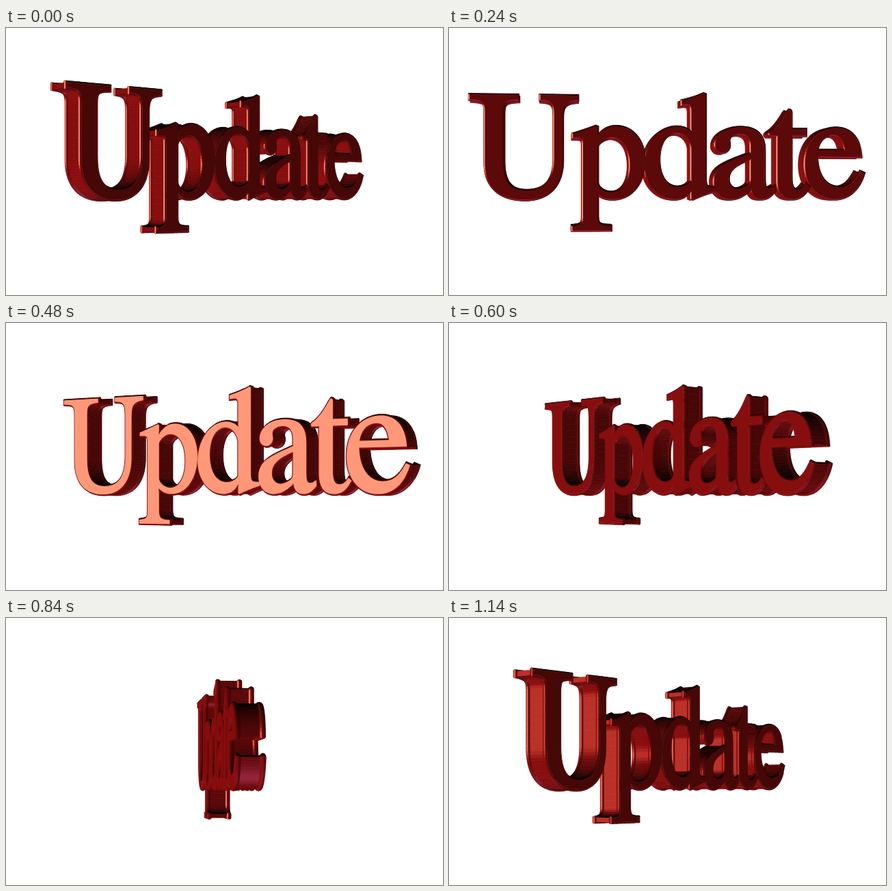
Animation, 639 px wide and 391 px high, one loop 1200 ms. Source, as an HTML page with a canvas:

```html
<!DOCTYPE html>
<html lang="en">
<head>
<meta charset="utf-8">
<title>Update</title>
<style>
  html, body { margin: 0; width: 100%; height: 100%; overflow: hidden; background: #fff; }
  canvas { display: block; }
</style>
</head>
<body>
<canvas id="stage" width="639" height="391" role="img" aria-label="Update"></canvas>
<script>
const ctx = document.getElementById('stage').getContext('2d');
const W = 639, H = 391;
const STEP = 60, STEPS = 20, TURN = 9, START = 42;   // ms, poses per loop, degrees
const CX = 319.5, HORIZON = 248, DIST = 1490;
const SIZE = 217, TRACK = -9.7, LEFT = -285.5, BASE = -1;
// Cross-section of the extrusion, back to front: [depth, outset]
const PROFILE = [[-19, 1.2], [-18, 2.6], [-16, 3.2], [-14, 2.7], [-12, 1], [11, 1], [13, 2.7], [15, 3.2], [17, 2.6], [18, 1.2]];

// Roman letterforms on a 1000-unit em, y up; outer loops run clockwise
const GLYPHS = {
  U: { adv: 722, path: `M14 662 L314 662 L314 643 C228 638 215 625 215 553 L215 238 C215 98 262 34 376 34
    C500 34 563 100 563 255 L563 530 C563 622 549 638 473 643 L473 662 L705 662 L705 643
    C632 635 605 615 605 530 L605 243 C605 75 515 -14 363 -14 C200 -14 113 72 113 226
    L113 553 C113 627 102 637 14 643` },
  p: { adv: 500, path: `M9 395 L9 410 C60 425 105 442 154 460 L159 458 L159 383 C200 437 235 460 290 460
    C395 460 470 370 470 238 C470 95 385 -10 268 -10 C222 -10 194 2 159 33 L159 -128
    C159 -180 172 -199 247 -200 L247 -217 L5 -217 L5 -200 C66 -195 75 -183 75 -131
    L75 342 C75 382 68 394 35 394
    M159 334 L159 91 C159 60 205 22 256 22 C335 22 385 95 385 208 C385 325 335 400 255 400 C205 400 159 355 159 334` },
  d: { adv: 500, path: `M491 58 L491 42 C440 30 390 10 345 -10 L340 -8 L340 66 C310 15 275 -10 227 -10
    C110 -10 27 85 27 206 C27 345 120 460 240 460 C280 460 312 445 340 417 L340 570
    C340 612 334 622 302 622 L276 620 L276 636 C330 649 380 665 418 683 L424 681 L424 126 C424 72 432 60 465 59
    M340 102 L340 328 C335 385 290 432 235 432 C160 432 112 360 112 248 C112 130 165 58 245 58 C290 58 325 76 340 102` },
  a: { adv: 444, path: `M442 66 L442 40 C412 2 385 -10 355 -10 C315 -10 293 14 288 62 C235 14 195 -10 142 -10
    C80 -10 37 34 37 100 C37 150 60 184 105 210 C145 234 190 252 287 288 L287 332
    C287 397 260 428 205 428 C160 428 128 408 128 378 C128 365 132 355 132 345
    C132 320 112 302 88 302 C64 302 45 320 45 346 C45 410 115 460 212 460
    C320 460 370 415 370 310 L370 120 C370 65 378 50 402 50 C416 50 427 54 442 66
    M287 262 C170 222 124 180 124 118 C124 76 152 45 192 45 C210 45 235 53 258 66 C283 82 287 90 287 130` },
  t: { adv: 278, path: `M255 450 L255 418 L154 418 L154 130 C154 68 168 40 205 40 C230 40 247 52 266 78 L279 67
    C250 15 215 -10 168 -10 C103 -10 70 30 70 112 L70 418 L17 418 C12 421 12 430 28 439
    C60 458 95 500 124 545 C134 562 142 573 147 579 C153 579 154 576 154 566 L154 450` },
  e: { adv: 444, path: `M408 164 L424 157 C396 62 327 -10 229 -10 C98 -10 25 91 25 219 C25 374 124 460 239 460
    C336 460 396 395 405 277 L97 277 C100 130 170 58 257 58 C325 58 365 90 408 164
    M99 309 L304 309 C293 383 268 425 213 425 C158 425 109 385 99 309` },
};

const unit = v => { const l = Math.hypot(...v) || 1; return v.map(c => c / l); };
const dot = (a, b) => a[0] * b[0] + a[1] * b[1] + a[2] * b[2];
const rad = d => d * Math.PI / 180;
const dist = (p, q) => Math.hypot(p[0] - q[0], p[1] - q[1]);

// Path text to closed loops of points
function flatten(path) {
  const loops = [];
  let loop, p;
  for (const [, cmd, args] of path.matchAll(/([MLC])([^MLC]+)/g)) {
    const v = args.trim().split(/\s+/).map(Number), end = v.slice(-2);
    if (cmd === 'M') loops.push(loop = []);
    if (cmd === 'C') {
      const n = Math.ceil(3 + dist(p, end) / 18);
      for (let i = 1; i < n; i++) {
        const t = i / n, u = 1 - t;
        loop.push([0, 1].map(k => u * u * u * p[k] + 3 * u * u * t * v[k] + 3 * u * t * t * v[k + 2] + t * t * t * v[k + 4]));
      }
    }
    loop.push(p = end);
  }
  return loops.map(l => dist(l[0], l[l.length - 1]) < 1 ? l.slice(0, -1) : l);
}

// Short pieces keep the depth sort reliable
function subdivide(loop, max) {
  return loop.flatMap((p, i) => {
    const q = loop[(i + 1) % loop.length];
    const n = Math.ceil(dist(p, q) / max) || 1;
    return Array.from({ length: n }, (_, k) => [p[0] + (q[0] - p[0]) * k / n, p[1] + (q[1] - p[1]) * k / n]);
  });
}

// Vertices with position and outward miter; edges with normal and midpoint
function buildMesh(word) {
  const loops = [], edges = [];
  const k = SIZE / 1000;
  let left = LEFT;
  for (const ch of word) {
    for (const raw of flatten(GLYPHS[ch].path)) {
      const pts = subdivide(raw.map(([x, y]) => [left + x * k, BASE - y * k]), 10);
      const n = pts.length;
      const normals = pts.map((p, i) => {
        const q = pts[(i + 1) % n], l = dist(p, q) || 1;
        return [(q[1] - p[1]) / l, (p[0] - q[0]) / l];
      });
      const verts = pts.map((p, i) => {
        const a = normals[(i + n - 1) % n], b = normals[i];
        const m = Math.max(0.6, 1 + a[0] * b[0] + a[1] * b[1]);
        return { x: p[0], y: p[1], mx: (a[0] + b[0]) / m, my: (a[1] + b[1]) / m };
      });
      verts.forEach((a, i) => {
        const b = verts[(i + 1) % n];
        edges.push({ a, b, nx: normals[i][0], ny: normals[i][1], x: (a.x + b.x) / 2, y: (a.y + b.y) / 2 });
      });
      loops.push(verts);
    }
    left += GLYPHS[ch].adv * k + TRACK;
  }
  return { loops, edges };
}

const yaw = d => [Math.sin(rad(d)), 0, Math.cos(rad(d))];
const KEY = yaw(-66), SHINE = yaw(-30), GLOW = unit([0.08, -0.66, 0.74]);

// World normal (y up) to colour
function shade(n) {
  const sky = 50 * n[1] + 22 * Math.abs(n[1]);
  const red = Math.max(0, 70 + 67 * Math.max(0, dot(n, KEY)) - sky);
  const shine = Math.max(0, dot(n, SHINE)) ** 110;
  const glow = Math.max(0, dot(n, GLOW)) ** 24;
  const r = red + 220 * shine + 45 * glow;
  const g = red * 0.1 + 140 * shine + 25 * glow;
  const b = red * 0.1 + 108 * shine + 50 * glow;
  return `rgb(${[r, g, b].map(c => Math.min(255, Math.round(c))).join()})`;
}

const mesh = buildMesh('Update');

function draw(deg) {
  const c = Math.cos(rad(deg)), s = Math.sin(rad(deg));
  const cam = [-DIST * s, 0, DIST * c];
  const turn = (x, y, z) => [x * c + z * s, -y, z * c - x * s];
  const project = (v, [z, out]) => {
    const x = v.x + v.mx * out, y = v.y + v.my * out;
    const k = DIST / (DIST - (z * c - x * s));
    return [CX + (x * c + z * s) * k, HORIZON + y * k];
  };

  ctx.fillStyle = '#fff';
  ctx.fillRect(0, 0, W, H);
  ctx.lineWidth = 0.7;
  ctx.lineJoin = 'round';

  for (const e of mesh.edges) e.d = Math.hypot(e.x - cam[0], e.y - cam[1]);
  mesh.edges.sort((p, q) => q.d - p.d);

  // Each band lies between parallel planes, so back to front is exact
  for (let i = 0; i < PROFILE.length - 1; i++) {
    const lo = PROFILE[i], hi = PROFILE[i + 1];
    const [flat, lean] = unit([hi[0] - lo[0], lo[1] - hi[1]]);
    const mid = (lo[1] + hi[1]) / 2;
    for (const e of mesh.edges) {
      const n = [e.nx * flat, e.ny * flat, lean];
      const view = [cam[0] - e.x - e.nx * mid, cam[1] - e.y - e.ny * mid, cam[2] - (lo[0] + hi[0]) / 2];
      if (dot(n, view) <= 0) continue;
      ctx.fillStyle = ctx.strokeStyle = shade(turn(...n));
      ctx.beginPath();
      ctx.moveTo(...project(e.a, lo));
      ctx.lineTo(...project(e.b, lo));
      ctx.lineTo(...project(e.b, hi));
      ctx.lineTo(...project(e.a, hi));
      ctx.closePath();
      ctx.fill();
      ctx.stroke();
    }
  }

  const front = PROFILE[PROFILE.length - 1];
  ctx.fillStyle = shade(turn(0, 0, 1));
  ctx.beginPath();
  for (const loop of mesh.loops) {
    loop.forEach((v, i) => ctx[i ? 'lineTo' : 'moveTo'](...project(v, front)));
    ctx.closePath();
  }
  ctx.fill();
}

let shown = -1;
function tick() {
  const k = Math.floor(performance.now() / STEP) % STEPS;
  if (k !== shown) {
    shown = k;
    const deg = START - TURN * k;
    draw(deg < -90 ? deg + 180 : deg);
  }
  requestAnimationFrame(tick);
}
tick();
</script>
</body>
</html>
```
